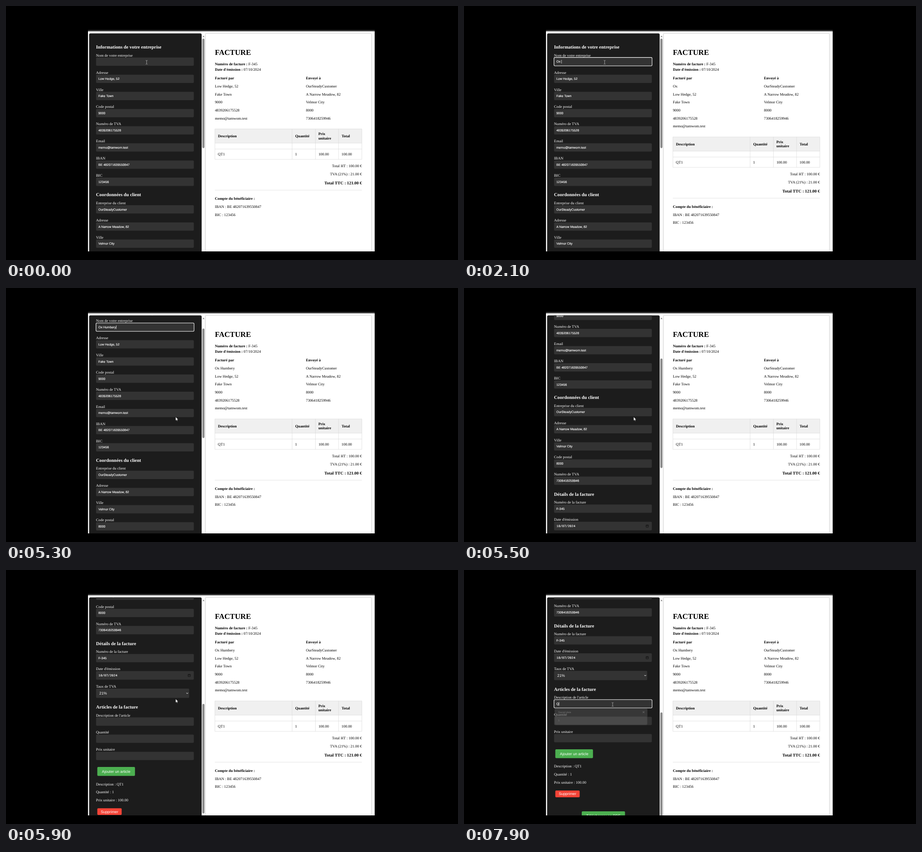
An HTML page for the animation above (8 s loop, 998 px wide and 561 px high).

```html
<!DOCTYPE html>
<html lang="fr">
<head>
<meta charset="utf-8">
<title>Facture</title>
<style>
html, body { margin: 0; width: 100%; height: 100%; overflow: hidden; background: #000; }
svg { display: block; }
text {
  font: 8.37px "Liberation Serif", "Times New Roman", serif;
  fill: #000; white-space: pre; text-rendering: geometricPrecision;
}
.b { font-weight: bold; }
.h1 { font-size: 16.74px; font-weight: bold; }
.sum { font-size: 9.4px; font-weight: bold; }
.end { text-anchor: end; }
.mid { text-anchor: middle; }
#form text { fill: #fff; }
#form .h { font-size: 10.42px; font-weight: bold; }
#form .in, #form .date, #form .pop { font: 6.93px "Liberation Sans", Arial, sans-serif; stroke: #fff; stroke-width: .15px; }
#form .date { font-family: "Liberation Mono", monospace; }
#form .ui { font-family: "Liberation Sans", Arial, sans-serif; }
#form .pop { font-size: 5.6px; fill: #777; stroke: none; }
</style>
</head>
<body>
<svg id="stage" width="998" height="561" viewBox="0 0 998 561">
  <defs>
    <clipPath id="view"><rect x="181" y="53" width="633" height="489"/></clipPath>
    <clipPath id="pane"><path d="M183.5 542V63.5a3 3 0 0 1 3-3H429a3 3 0 0 1 3 3V542Z"/></clipPath>
  </defs>
  <g clip-path="url(#view)">
    <rect x="181" y="53" width="633" height="3.2" fill="#3d3d3d"/>
    <rect x="181" y="56" width="633" height="486" fill="#fff"/>
    <g clip-path="url(#pane)">
      <rect x="183" y="60" width="250" height="483" fill="#1c1c1c"/>
      <g id="form"></g>
    </g>
    <path d="M433.8 68.5h4.4L436 65.6Z" fill="#858585"/>
    <rect id="thumb" x="433.4" y="72" width="4.8" height="242" rx="2.4" fill="#8b8b8b"/>
    <rect x="440.6" y="60.6" width="366.2" height="520" rx="2.5" fill="#fff" stroke="#d6d6d6" stroke-width=".7"
      style="filter:drop-shadow(0 0 1.6px rgba(0,0,0,.22))"/>
    <g id="bill"></g>
  </g>
  <path id="beam" d="M-2-4.2Q0-4.2 0-3.2Q0-4.2 2-4.2M0-3.4V3.4M-2 4.2Q0 4.2 0 3.2Q0 4.2 2 4.2" fill="none" stroke="#b4b4b4" stroke-width=".8"/>
  <path id="arrow" d="M0 0V8.2L1.9 6.5L3.2 9.3L4.5 8.7L3.3 6H5.8Z" fill="#fff" stroke="#111" stroke-width=".5"/>
</svg>
<script>
const $ = id => document.getElementById(id);
const form = $('form'), bill = $('bill');

function add(parent, tag, attrs, text = '') {
  const el = document.createElementNS('http://www.w3.org/2000/svg', tag);
  for (const k in attrs) el.setAttribute(k, attrs[k]);
  el.textContent = text;
  parent.append(el);
  return el;
}
const put = (parent, x, y, text, cls = '') => add(parent, 'text', { x, y, class: cls }, text);
const box = (parent, x, y, width, height, fill, rx = 0) =>
  add(parent, 'rect', { x, y, width, height, fill, rx });
const show = (el, on) => el.setAttribute('visibility', on ? 'visible' : 'hidden');
const move = (el, x, y) => el.setAttribute('transform', `translate(${x} ${y})`);

const STEP = 37.9, ROW = 17.68, LEFT = 198.8;
const seller = ['Low Hedge, 52', 'Fake Town', '9000', '4839206175528', 'memo@tamwom.test'];
const client = ['OurSteadyCustomer', 'A Narrow Meadow, 82', 'Velmor City', '8000', '7306418259946'];
const iban = 'BE 482071639550847', bic = '123456';

// Form column
function section(y, title, labels, values) {
  put(form, LEFT, y, title, 'h');
  labels.forEach((label, i) => {
    const base = y + 17.5 + i * STEP;
    put(form, LEFT, base, label);
    if (values[i] === undefined) return;
    box(form, LEFT, base + 2.1, 215.9, 18.3, '#333', 2);
    put(form, 204, base + 13.7, values[i], 'in');
  });
}
section(94.2, 'Informations de votre entreprise',
  ['Nom de votre entreprise', 'Adresse', 'Ville', 'Code postal', 'Numéro de TVA', 'Email', 'IBAN', 'BIC'],
  ['', ...seller, iban, bic]);
section(420.4, 'Coordonnées du client',
  ['Entreprise du client', 'Adresse', 'Ville', 'Code postal', 'Numéro de TVA'], client);
section(633.8, 'Détails de la facture', ['Numéro de la facture', "Date d'émission"], ['F-345']);
box(form, LEFT, 691.3, 215.9, 19, '#333', 2);
put(form, 204.3, 703.3, '10/07/2024', 'date');
add(form, 'path', { d: 'M402 698.4h5v5h-5ZM402 700h5', fill: 'none', stroke: '#111', 'stroke-width': .9 });
put(form, LEFT, 728.2, 'Taux de TVA');
box(form, LEFT, 729.9, 205.7, 20.6, '#333', 2);
put(form, 206, 743, '21%', 'ui');
add(form, 'path', { d: 'M398.2 739.2l2 2l2-2', fill: 'none', stroke: '#fff', 'stroke-width': 1 });
section(774, 'Articles de la facture', ["Description de l'article", 'Quantité', 'Prix unitaire'], ['', '', '']);

function button(x, y, w, h, fill, text) {
  box(form, x, y, w, h, fill, 2);
  put(form, x + w / 2, y + h / 2 + 3, text, 'ui mid');
}
button(201.6, 903.1, 83.2, 19.7, '#4caf50', 'Ajouter un article');
['Description : QT1', 'Quantité : 1', 'Prix unitaire : 100.00']
  .forEach((s, i) => put(form, LEFT, 943.7 + i * ROW, s));
button(201.6, 994.3, 53.8, 14.8, '#f44336', 'Supprimer');
button(260, 1040.2, 95.5, 19.7, '#4caf50', 'Télécharger en PDF');

// Focused field: ring, typed text and caret
const focus = add(form, 'g', {});
add(focus, 'rect', { x: 198.7, y: 113.6, width: 216.5, height: 18.6, rx: 2.2, fill: 'none', stroke: '#fff', 'stroke-width': 1.1 });
const typed = put(focus, 204, 125.4, '', 'in');
const caret = box(focus, 204, 119, .7, 8, '#fff');

const popup = add(form, 'g', {});
add(popup, 'rect', { x: 200, y: 812.6, width: 205, height: 37, rx: 3.5, fill: '#4a4a4a', 'fill-opacity': .6 });
add(popup, 'rect', { x: 201, y: 830.6, width: 203, height: 18, rx: 3, fill: '#666', 'fill-opacity': .25 });
put(popup, 208, 823.2, 'Saved data', 'pop');
put(popup, 208, 841.2, '1', 'pop');
add(popup, 'path', { d: 'M394.5 819.2l4 4m0-4l-4 4', stroke: '#888', 'stroke-width': .7 });

// Invoice column
const X = 461.2, R = 785.7, cols = [X, 631.7, 683.3, 734.2, R];
function pair(y, name, value) {
  const t = put(bill, X, y, '');
  add(t, 'tspan', { class: 'b' }, name + ' : ');
  add(t, 'tspan', {}, value);
}
put(bill, X, 107.7, 'FACTURE', 'h1');
pair(130.6, 'Numéro de facture', 'F-345');
pair(142.7, "Date d'émission", '07/10/2024');
put(bill, X, 162.4, 'Facturé par', 'b');
put(bill, 662.3, 162.4, 'Envoyé à', 'b');
client.forEach((s, i) => put(bill, 662.3, 180 + i * ROW, s));
const company = put(bill, X, 180, '');

const below = add(bill, 'g', {});
seller.forEach((s, i) => put(below, X, 180 + (i + 1) * ROW, s));
box(below, X, 289.2, R - X, 31.3, '#f0f0f0');
const lines = [289.2, 320.5, 333.6, 356.4].map(y => `M${X} ${y}H${R}`)
  .concat(cols.map(x => `M${x} 289.2V356.4`), `M${X} 424.4H${R}`);
add(below, 'path', { d: lines.join(''), stroke: '#d9d9d9', 'stroke-width': .7 });
['Description', 'Quantité', '', 'Total'].forEach((s, i) => put(below, cols[i] + 6.8, 307.8, s, 'b'));
put(below, cols[2] + 6.4, 303, 'Prix', 'b');
put(below, cols[2] + 6.4, 312.4, 'unitaire', 'b');
['QT1', '1', '100.00', '100.00'].forEach((s, i) => put(below, cols[i] + 6.6, 347.8, s));
put(below, R, 374, 'Total HT : 100.00 €', 'end');
put(below, R, 391.7, 'TVA (21%) : 21.00 €', 'end');
put(below, R, 411.5, 'Total TTC : 121.00 €', 'sum end');
put(below, X, 445.7, 'Compte du bénéficiaire :', 'b');
put(below, X, 463.5, 'IBAN : ' + iban);
put(below, X, 481.2, 'BIC : ' + bic);

// Timing: [ms, value]
const NAME = 'Ox Humbery';
const keys = [[100, 0], [1600, 1], [2000, 2], [2100, 3], [2600, 4], [3000, 5], [3200, 6],
  [3300, 7], [3400, 8], [3500, 8], [4000, 9], [4200, 10]];
const itemKeys = [[6900, 0], [7900, 1]];
const scrolls = [[5100, 0], [5200, 9], [5300, 36.4], [5400, 100], [5700, 325.3], [5900, 468], [6000, 507.2]];

const last = (list, t) => list.filter(k => k[0] <= t).pop();
function mix(list, t) {
  const i = list.findIndex(p => p[0] > t);
  if (i < 0) return list[list.length - 1][1];
  if (!i) return list[0][1];
  const [a, u] = list[i - 1], [b, v] = list[i];
  return u + (v - u) * (t - a) / (b - a);
}

function draw(t) {
  const scroll = mix(scrolls, t);
  move(form, 0, -scroll);
  $('thumb').setAttribute('y', 72 + scroll * .478);

  const item = t >= 6900;
  const key = last(item ? itemKeys : keys, t);
  const name = NAME.slice(0, (last(keys, t) || [0, 0])[1]);
  company.textContent = name;
  move(below, 0, name ? 0 : -ROW);

  const focused = key && (t < 6800 || item);
  focus.setAttribute('display', focused ? 'inline' : 'none');
  if (focused) {
    move(focus, 0, item ? 679.8 : 0);
    typed.textContent = item ? 'Q'.slice(0, key[1]) : name;
    caret.setAttribute('x', 204.1 + (typed.textContent ? typed.getComputedTextLength() : 0));
    show(caret, (t - key[0]) % 1000 < 500);
  }
  show(popup, t >= 7900);

  const onField = t < 4900 || t >= 6600;
  show($('beam'), onField);
  show($('arrow'), !onField);
  if (t < 4900) move($('beam'), 310.5, 124.3);
  else move($('beam'), 328.2, 297);
  const out = mix([[4800, 0], [5000, 1]], t), back = mix([[6200, 0], [6600, 1]], t);
  move($('arrow'), 310.5 + 64 * out - 46 * back, 124.3 + 160.5 * out + 9 * back);
}

const start = performance.now();
function tick() {
  const t = (performance.now() - start) % 8000;
  draw(Math.floor(t / 100) * 100);
  requestAnimationFrame(tick);
}
tick();
</script>
</body>
</html>
```
